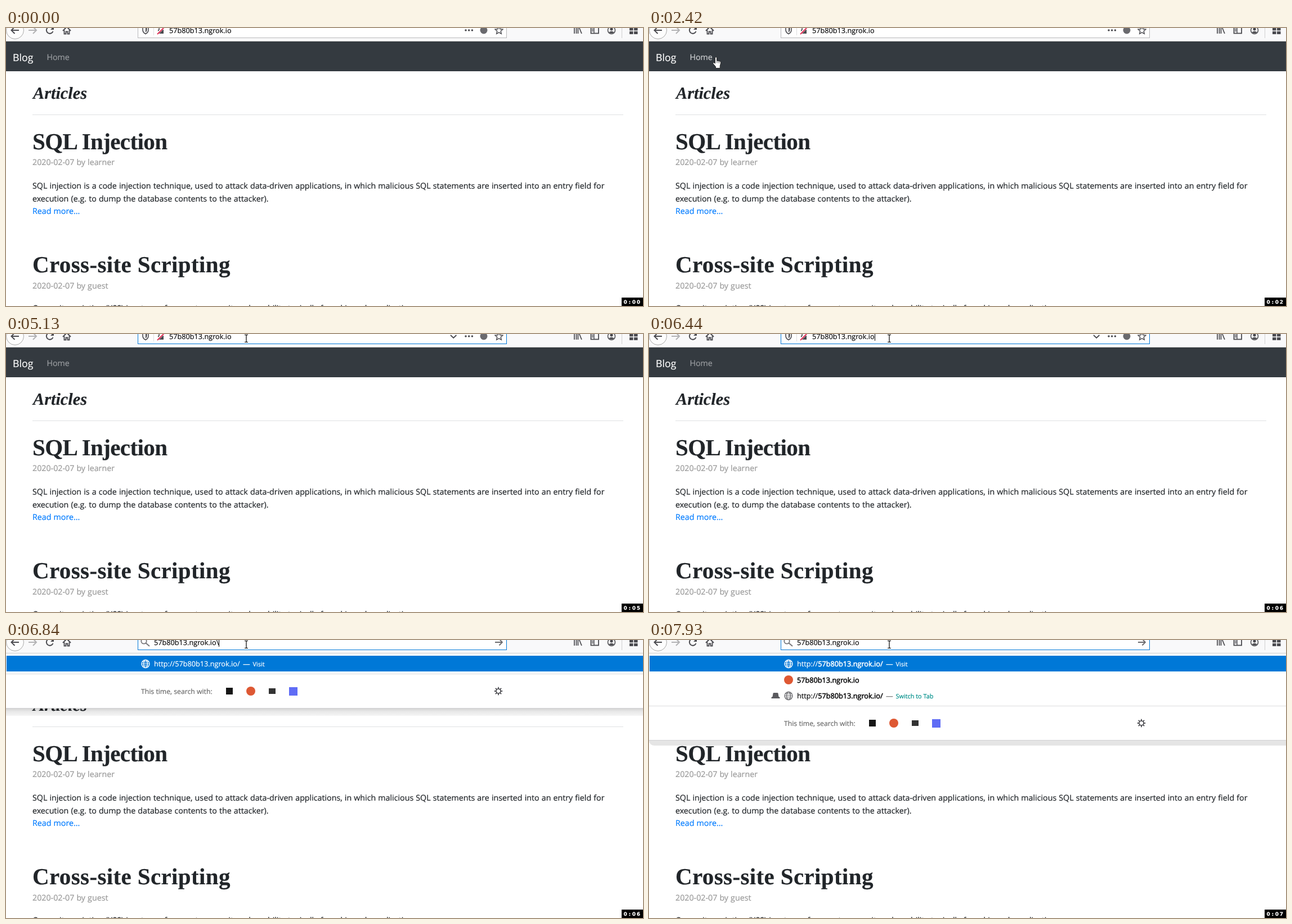
An HTML page with a canvas that plays this animation: 1132 px wide and 495 px high, repeating every 8000 ms.

```html
<!DOCTYPE html>
<html lang="en">
<head>
<meta charset="utf-8">
<title>Blog</title>
<style>
html, body { margin: 0; width: 100%; height: 100%; overflow: hidden; background: #fff; }
canvas { display: block; width: 1132px; height: 495px; }
</style>
</head>
<body>
<canvas id="stage" width="1132" height="495"></canvas>
<script>
const ctx = document.getElementById('stage').getContext('2d');
const LOOP = 8000;
const SANS = '"Open Sans", "Noto Sans", sans-serif';
const SERIF = '"Liberation Serif", "Noto Serif", serif';
const HOST = '57b80b13.ngrok.io';
const BLUE = '#0078d7';
const INK = '#212529';
const ICON = '#4a4a4f';

// Pointer steps: time, kind, x, y
const POINTER = [
  [0, '', 0, 0], [120, 'arrow', 427, 491], [270, 'arrow', 369, 259],
  [520, 'arrow', 348, 213], [640, 'arrow', 318, 150], [760, 'arrow', 300, 115],
  [910, 'arrow', 276, 125], [1030, 'arrow', 238, 142], [1130, 'arrow', 205, 155],
  [1250, 'arrow', 182, 163], [1530, 'arrow', 152, 131], [1650, 'arrow', 130, 108],
  [1930, 'arrow', 121, 80], [2050, 'hand', 108, 46], [2150, 'hand', 112, 61],
  [2300, 'hand', 113, 56], [2420, 'hand', 113, 51], [2540, 'arrow', 300, 40],
  [2790, 'beam', 390, 10], [2910, 'beam', 427, 8]
];
const TICKS = [1130, 2150, 3130, 4110, 5130, 6160, 7260];
const CARET = [4350, 4600, 5230, 5790, 6440, 7380, 7690, 7930];

const passed = (list, t) => list.filter(v => t >= v).length;
const between = (t, a, b) => t >= a && t < b;

function box(x, y, w, h, color) {
  ctx.fillStyle = color;
  ctx.fillRect(x, y, w, h);
}

function disc(x, y, r, color) {
  ctx.fillStyle = color;
  ctx.beginPath();
  ctx.arc(x, y, r, 0, 7);
  ctx.fill();
}

function ring(x, y, r, color, width = 1.5) {
  ctx.strokeStyle = color;
  ctx.lineWidth = width;
  ctx.beginPath();
  ctx.arc(x, y, r, 0, 7);
  ctx.stroke();
}

function line(d, color = ICON, width = 1.8) {
  ctx.strokeStyle = color;
  ctx.lineWidth = width;
  ctx.stroke(new Path2D(d));
}

function shape(d, color) {
  ctx.fillStyle = color;
  ctx.fill(new Path2D(d));
}

function text(s, x, y, size, color, opt = {}) {
  const { family = SANS, style = '', track = 0, space = 0, weight = 0.2 } = opt;
  ctx.font = `${style} ${size}px ${family}`;
  ctx.letterSpacing = track + 'px';
  ctx.wordSpacing = space + 'px';
  ctx.fillStyle = ctx.strokeStyle = color;
  ctx.lineWidth = weight;
  ctx.fillText(s, x, y);
  ctx.strokeText(s, x, y);
  return x + ctx.measureText(s).width;
}

const body = (s, y, color = INK, x = 47) => text(s, x, y, 14.24, color, { space: 0.42 });

function title(s, y, track) {
  text(s, 47, y, 41, INK, { style: 'bold', family: SERIF, track });
}

function page(hover) {
  box(0, 0, 1132, 495, '#fff');
  box(0, 24, 1132, 53, '#343a40');
  text('Blog', 12, 58.5, 17.75, '#fff');
  body('Home', 57, hover ? '#ccced0' : '#999c9f', 72.5);

  text('Articles', 48, 126, 30.3, INK, { style: 'italic bold', family: SERIF });
  box(47, 154, 1050, 1, '#dfe1e3');

  title('SQL Injection', 215.5, -0.6);
  body('2020-02-07 by learner', 244, '#999');
  body('SQL injection is a code injection technique, used to attack data-driven applications, in which malicious SQL statements are inserted into an entry field for', 286);
  body('execution (e.g. to dump the database contents to the attacker).', 308.5);
  body('Read more...', 331, '#007bff');

  title('Cross-site Scripting', 435, 0.38);
  body('2020-02-07 by guest', 463.5, '#999');
  body('Cross-site scripting (XSS) is a type of computer security vulnerability typically found in web applications.', 504);
}

function magnifier() {
  ring(245, 2, 4.7, '#77777b', 1.8);
  line('M248.5 5.5L255 11', '#77777b', 2);
}

function toolbar(t, open) {
  const focus = t >= 3530;
  const hover = t >= 2790;
  box(0, 0, 1132, 23, '#f9f9fa');
  box(0, 23, 1132, 1, '#ccc');

  disc(16, 4, 15.5, '#fdfdfd');
  ring(16, 4, 15.5, '#aaa', 1);
  line('M23 4H10M15.5 -2L9.5 4L15.5 10', ICON, 2);
  line('M40 4H53M48 -2L54 4L48 10', '#b3b3b5', 2);
  line('M82.5 0A6 6 0 1 0 83.5 6', ICON, 2);
  shape('M85 -3V3H79Z', ICON);
  line('M101 5L108 -2L115 5', ICON, 2);
  line('M103.5 4V10.5H106.5V6.5H109.5V10.5H112.5V4', ICON, 1.8);

  box(234, -8, 656, 26, focus ? BLUE : hover ? '#949497' : '#b8b8ba');
  box(235, -8, 654, 25, '#fff');
  if (open) {
    magnifier();
    line('M869 4H882M876.5 -1.5L882 4L876.5 9.5', '#6a6a6e', 1.8);
  } else {
    line('M243 -2V3Q243 8 248 10.5Q253 8 253 3V-2', ICON, 1.6);
    shape('M248 -2V8Q250.5 6 250.5 3V-2Z', ICON);
    box(262, 0, 1, 13, '#dcdcde');
    line('M272 4V0Q275 -5 278 0V4', ICON, 1.6);
    box(270, 3, 10, 7, ICON);
    line('M268.5 10.5L281 -2', '#fff', 4);
    line('M269 11L281 -1', '#e22850', 1.8);
    if (hover) line('M790 2L795.2 7L800.4 2', ICON, 1.8);
    [817, 822.7, 828.4].forEach(x => disc(x, 4, 1.8, ICON));
    disc(849, 4, 6.5, '#6a6a6e');
    let star = '';
    for (let i = 0; i < 10; i++) {
      const a = i * Math.PI / 5 - Math.PI / 2;
      const r = i % 2 ? 3.4 : 7.2;
      star += (i ? 'L' : 'M') + (876 + r * Math.cos(a)) + ' ' + (4.5 + r * Math.sin(a));
    }
    line(star + 'Z', ICON, 1.5);
  }

  line('M1010 -2V10M1013.5 -2V10M1016.5 -2V10M1018.5 -1L1023 10', ICON, 1.7);
  ctx.strokeStyle = ICON;
  ctx.lineWidth = 1.8;
  ctx.strokeRect(1039.5, -2, 13.5, 11.5);
  line('M1045 -2V9.5M1041 2H1044M1041 5H1044', ICON, 1.4);
  ring(1076, 4, 6.5, ICON, 1.5);
  disc(1076, 2, 2.6, ICON);
  shape('M1071.5 7.5Q1076 4 1080.5 7.5Q1076 11.5 1071.5 7.5Z', ICON);
  box(1094, 0, 1, 18, '#d0d0d2');
  for (const x of [1108, 1116]) {
    box(x, 0, 6.5, 4.5, ICON);
    box(x, 6, 6.5, 5, ICON);
  }
}

function address(t, open) {
  const x = open ? 263 : 290;
  const selected = between(t, 3650, 4230);
  if (selected) box(x, 0, 111, 12, BLUE);
  const slash = between(t, 6720, 7690) ? '\\' : '';
  text(HOST + slash, x, 9, 12.7, selected ? '#fff' : '#0c0c0d');
  const on = passed(CARET, t) % 2;
  if (on) box(open ? (slash ? 378 : 374) : 401, 0, 1, 12, '#000');
}

function globe(x, y, color) {
  ring(x, y, 7, color, 1.3);
  ctx.beginPath();
  ctx.ellipse(x, y, 3.4, 7, 0, 0, 7);
  ctx.stroke();
  line(`M${x - 7} ${y}H${x + 7}M${x - 6} ${y - 3.5}H${x + 6}M${x - 6} ${y + 3.5}H${x + 6}`, color, 1.1);
}

function gear(x, y) {
  ring(x, y, 4, ICON, 1.7);
  for (let i = 0; i < 8; i++) {
    const c = Math.cos(i * Math.PI / 4), s = Math.sin(i * Math.PI / 4);
    line(`M${x + 4 * c} ${y + 4 * s}L${x + 7.3 * c} ${y + 7.3 * s}`, ICON, 1.8);
  }
}

function link(y, color, weight, action, actionColor) {
  let x = text('http://', 263, y, 12.7, color);
  x = text(HOST, x, y, 12.7, color, { weight });
  text('/', x, y, 12.7, color, { weight });
  text('—', 421, y, 12.7, actionColor === '#fff' ? '#fff' : '#777');
  text(action, 438.5, y, 10.9, actionColor);
}

function shadow(bottom, flat) {
  if (flat) {
    ctx.fillStyle = 'rgba(0,0,0,.1)';
    ctx.beginPath();
    ctx.roundRect(0, bottom - 12, 1150, 21, [0, 0, 0, 9]);
    ctx.fill();
    return;
  }
  const g = ctx.createLinearGradient(0, bottom, 0, bottom + 13);
  g.addColorStop(0, 'rgba(0,0,0,.17)');
  g.addColorStop(0.4, 'rgba(0,0,0,.09)');
  g.addColorStop(1, 'rgba(0,0,0,.04)');
  box(0, bottom, 1132, 13, g);
}

function dropdown(t) {
  const rows = t >= 7810 ? 3 : t >= 6960 ? 2 : 1;
  const extra = Math.round((rows - 1) * 28.4);
  const bottom = 122 + extra;
  shadow(bottom, rows === 3);
  box(0, 24, 1132, bottom - 24, '#fff');
  box(0, bottom - 1, 1132, 1, '#d2d2d4');
  box(1, 28, 1131, 28, BLUE);
  globe(248, 42.5, '#fff');
  link(47, '#fff', t >= 7690 ? 0.55 : 0.2, 'Visit', '#fff');

  if (rows > 1) {
    disc(248, 71, 8, '#de5833');
    text(HOST + (t < 7690 ? '\\' : ''), 263, 75.5, 12.7, '#0c0c0d', { weight: 0.55 });
  }
  if (rows > 2) {
    shape('M217.5 104V102L219.5 101L220.5 95Q220.7 94 222 94H228Q229.3 94 229.5 95L230.5 101L232.5 102V104Z', '#5a5a5e');
    globe(248, 99.5, '#6a6a6e');
    link(104, '#0c0c0d', 0.55, 'Switch to Tab', '#008f8a');
  }

  box(0, 60 + extra, 1132, 1, '#dcdcde');
  text('This time, search with:', 240, 96 + extra, 12.24, '#6a6a6a');
  if (t >= 6840) {
    const y = 91 + extra;
    box(391, y - 6, 12, 12, '#161616');
    disc(435, y, 8, '#de5833');
    box(467, y - 5, 12, 10, '#333');
    box(503, y - 7, 15, 15, '#5f6cf5');
  }
  gear(875, 91 + extra);
}

function pointer(t) {
  const [, kind, x, y] = POINTER.filter(p => t >= p[0]).pop();
  if (!kind) return;
  ctx.save();
  ctx.translate(x, y);
  if (kind === 'beam') {
    line('M-3 -6.5H-.7L0 -5.8L.7 -6.5H3M0 -6V6M-3 6.5H-.7L0 5.8L.7 6.5H3', '#000', 1.2);
  } else {
    const d = kind === 'arrow'
      ? 'M.5 .5V15.5L4 12.3L6.3 17.5L8.5 16.5L6.3 11.5H11Z'
      : 'M4.5 1.8Q6 -.4 7.5 1.8V7L13 8.2Q15 9 14.7 11L13.2 16.5V20.5H5.5V18L1 12.5Q.2 10.5 2 10.3L4.5 12Z';
    shape(d, '#fff');
    line(d, kind === 'arrow' ? '#000' : '#222', 0.9);
    if (kind === 'hand') line('M7.5 7V11M10 8V11.5M12.3 8.5V12', '#444', 0.7);
  }
  ctx.restore();
}

function clock(t) {
  const put = (s, x) => text(s, x, 490.5, 9, '#fff',
    { style: 'bold', family: '"DejaVu Sans", sans-serif' });
  box(1094, 480, 38, 15, '#000');
  put('0', 1097.5);
  put(':', 1106.5);
  put('0', 1112.8);
  put(passed(TICKS, t), 1120.8);
}

function draw(now) {
  const t = now % LOOP;
  const open = t >= 6720;
  ctx.textRendering = 'geometricPrecision';
  page(between(t, 2050, 2540));
  toolbar(t, open);
  address(t, open);
  if (open) dropdown(t);
  pointer(t);
  clock(t);
}

const start = performance.now();
function loop() {
  draw(performance.now() - start);
  requestAnimationFrame(loop);
}
loop();
</script>
</body>
</html>
```
